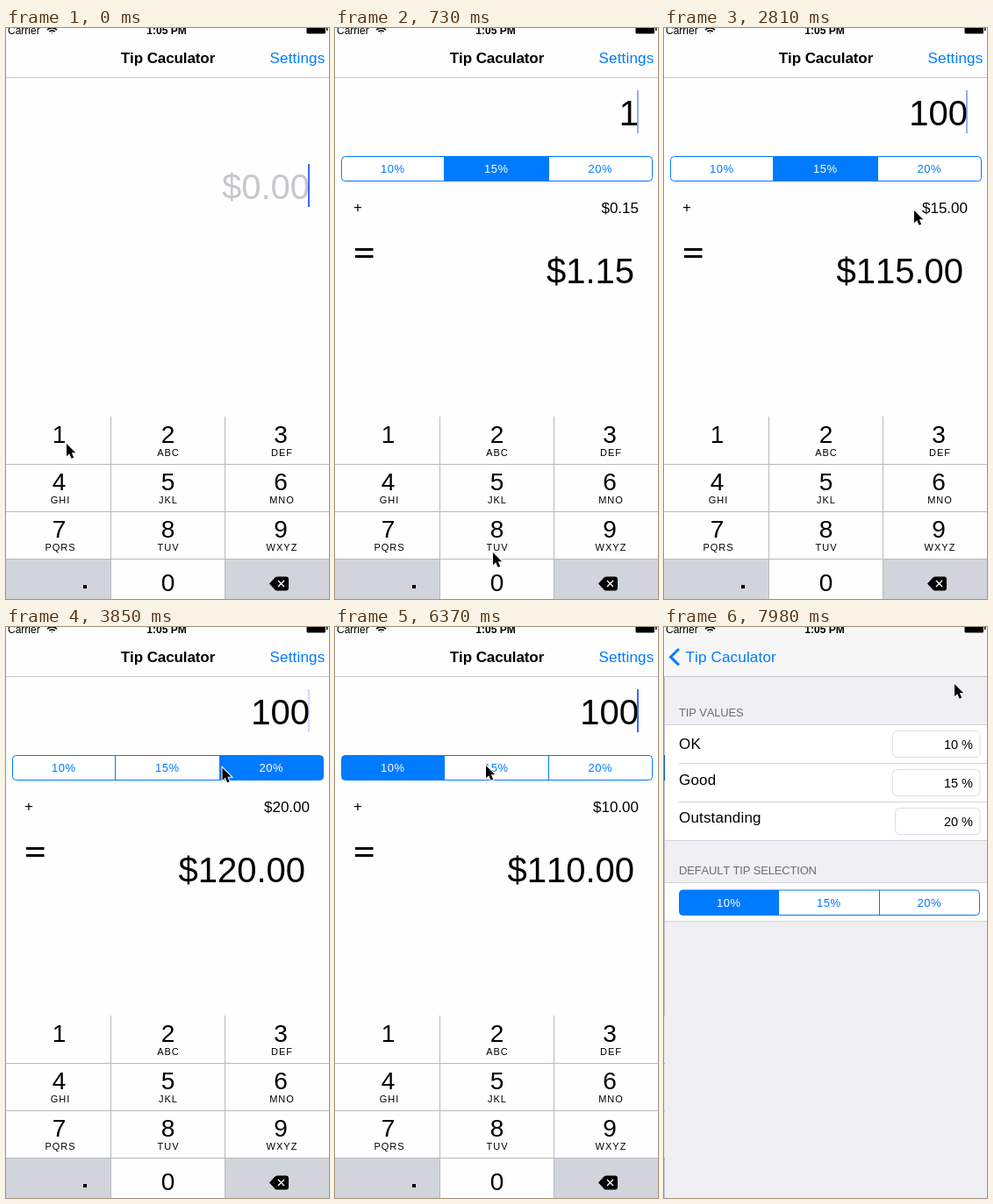
Recreate the animation shown at these times as an HTML page. Size 368 px wide and 651 px high, loop 8 s.

```html
<!DOCTYPE html>
<html lang="en">
<head>
<meta charset="utf-8">
<title>Tip calculator</title>
<style>
  html, body { margin: 0; width: 100%; height: 100%; overflow: hidden; background: #fefefe; }
  svg { display: block; width: 368px; height: 651px; }
  text { font-family: "Liberation Sans", Arial, sans-serif; font-size: 17px; font-kerning: none; white-space: pre; }
  .big { font-size: 40px; }
  .digit { font-size: 28px; }
  .letters { font-size: 11px; letter-spacing: 1px; }
  .seg { font-size: 13px; letter-spacing: .6px; }
  .head { font-size: 13px; letter-spacing: -.17px; fill: #6d6d72; }
  .field { font-size: 14.5px; }
  .status { font-size: 12px; }
  .bold { font-weight: bold; }
  .mid { text-anchor: middle; }
  .end { text-anchor: end; }
  .blue { fill: #007aff; }
  .wide { letter-spacing: .18px; }
</style>
</head>
<body>
<svg viewBox="0 0 368 651">
  <defs>
    <linearGradient id="shade">
      <stop offset="0" stop-color="#000" stop-opacity="0"/>
      <stop offset="1" stop-color="#000" stop-opacity=".2"/>
    </linearGradient>
  </defs>
  <rect width="368" height="651" fill="#fefefe"/>

  <g id="main">
    <g id="bill">
      <text id="amount" class="big end" x="346" y="110.5"></text>
      <rect id="caret" x="344" y="71" width="2" height="49" fill="#3f68ee"/>
    </g>
    <g id="results">
      <g id="tips"></g>
      <text x="21" y="209.5">+</text>
      <text id="tip" class="end" x="346" y="210.5"></text>
      <path d="M23 252.5h20.5M23 260.5h20.5" stroke="#000" stroke-width="3"/>
      <text id="total" class="big end" x="341" y="290.5"></text>
    </g>
    <g id="keys"></g>
  </g>
  <rect id="dim" width="368" height="651" opacity="0"/>

  <g id="page">
    <rect x="-9" y="57" width="9" height="386" fill="url(#shade)"/>
    <rect width="368" height="651" fill="#efeff4"/>
    <path d="M0 111.5H368V243.5H0zM0 291.5H368V335.5H0z" fill="#fff"/>
    <path d="M0 111.5H368M0 243.5H368M0 291.5H368M0 335.5H368M16 155.5H368M16 199.5H368" stroke="#d3d3d7"/>
    <text class="head" x="16" y="101.5">TIP VALUES</text>
    <text class="head" x="16" y="281.5">DEFAULT TIP SELECTION</text>
    <g id="rows"></g>
    <g id="defaults"></g>
  </g>

  <rect id="nav" width="368" height="56"/>
  <path d="M0 56.5H368" stroke="#c6c6c8"/>
  <text class="status" x="2" y="6.5">Carrier</text>
  <g fill="none" stroke="#000" stroke-width="1.6">
    <path d="M47 2.2Q52.5 -2.4 58 2.2M49.3 4.2Q52.5 1.6 55.7 4.2"/>
    <path d="M51.3 5.4h2.4l-1.2 1.2z" fill="#000" stroke="none"/>
  </g>
  <text class="status bold mid" x="183" y="6.5">1:05 PM</text>
  <path d="M342.5 0h21.5v5q0 1.5-1.5 1.5h-18.5q-1.5 0-1.5-1.5zM365 0h1.5v3h-1.5z"/>
  <text id="title" class="bold mid" y="40" x="184.5" letter-spacing="-.1">Tip Caculator</text>
  <text id="settings" class="blue wide" x="300.5" y="40">Settings</text>
  <text id="back" class="blue wide" x="24" y="40">Tip Caculator</text>
  <path id="chevron" d="M17 25L7.5 34.2L17 43.4" fill="none" stroke="#007aff" stroke-width="3"/>

  <path id="mouse" d="M0 0V14.2L3.2 11.2L5.6 16.8L8.2 15.7L5.8 10.2H10.2Z" stroke="#fff" stroke-width="2" paint-order="stroke"/>
</svg>
<script>
const $ = id => document.getElementById(id);
const BLUE = '#007aff', GREY = '#d1d5db';
const STEP = 147.8, LOOP = 8000;
const clamp = v => Math.min(1, Math.max(0, v));
const smooth = v => (v = clamp(v), v * v * (3 - 2 * v));
const put = (id, attrs) => { for (const a in attrs) $(id).setAttribute(a, attrs[a]); };
const move = (id, x, y = 0) => put(id, { transform: `translate(${x} ${y})` });
const text = (cls, x, y, s) => `<text class="${cls}" x="${x}" y="${y}">${s}</text>`;
const rates = [10, 15, 20];

// Segmented control between the given edges; returns a function that selects a segment
function segments(id, edges, y, h) {
  const [l, , , r] = edges;
  const clip = id + 'Clip';
  const cells = rates.map((_, i) =>
    `<rect class="cell" x="${edges[i]}" y="${y}" width="${edges[i + 1] - edges[i]}" height="${h}"/>`).join('');
  const labels = rates.map((n, i) =>
    text('seg mid', (edges[i] + edges[i + 1]) / 2 - .2, y + 18.5, n + '%')).join('');
  const box = `x="${l}" y="${y}" width="${r - l}" height="${h}" rx="4"`;
  $(id).innerHTML = `<clipPath id="${clip}"><rect ${box}/></clipPath>
    <g clip-path="url(#${clip})">${cells}</g>
    <g fill="none" stroke="${BLUE}"><rect ${box}/>
    <path d="M${edges[1]} ${y}v${h}M${edges[2]} ${y}v${h}"/></g>${labels}`;
  const fills = $(id).querySelectorAll('.cell'), names = $(id).querySelectorAll('text');
  return pick => rates.forEach((_, i) => {
    fills[i].setAttribute('fill', i === pick ? BLUE : '#fff');
    names[i].setAttribute('fill', i === pick ? '#fff' : BLUE);
  });
}

function buildKeys() {
  const letters = ' ABC DEF GHI JKL MNO PQRS TUV WXYZ'.split(' ');
  const cols = [60.5, 184.5, 313];
  let out = `<rect y="443" width="368" height="208" fill="#fefefe"/>
    <rect id="key1" y="443" width="119" height="54" fill="${GREY}"/>
    <rect id="key0" x="120" y="606" width="129" height="45" fill="${GREY}"/>
    <path d="M0 605.5H119V651H0zM250 605.5H368V651H250z" fill="${GREY}"/>
    <path d="M119.5 443V651M249.5 443V651M0 497.5H368M0 551.5H368M0 605.5H368" stroke="#b9babd"/>`;
  for (let i = 0; i < 9; i++) {
    const x = cols[i % 3], y = 473 + 54 * Math.floor(i / 3);
    out += text('digit mid', x, y, i + 1) + text('letters mid', x + (i % 3 === 1 ? .5 : 1.5), y + 15, letters[i]);
  }
  out += text('digit mid', 184.5, 642, 0) + `<rect x="88" y="635" width="4" height="4"/>
    <path d="M300 633.5L306 627Q307 625.5 309 625.5H319Q322 625.5 322 628.5V638.5Q322 641.5 319 641.5H309Q307 641.5 306 640z"/>
    <path d="M310 630l7 7m0-7l-7 7" stroke="#fff" stroke-width="1.4"/>`;
  $('keys').innerHTML = out;
}

function buildRows() {
  const rows = [['OK', 139, 259.5, 118.5, 30], ['Good', 180, 259.5, 162.5, 30], ['Outstanding', 223, 262.5, 206.5, 30]];
  $('rows').innerHTML = rows.map(([name, base, x, y, h], i) =>
    text('wide', 16, base, name) +
    `<rect x="${x}" y="${y}" width="${359 - x}" height="${h}" rx="5" fill="#fff" stroke="#dedee0"/>` +
    text('field end', 351, y + 20, rates[i] + ' %')).join('');
}

buildKeys();
buildRows();
const pickTip = segments('tips', [7.5, 124.5, 243.5, 361.5], 146.5, 28);
segments('defaults', [16.5, 129.5, 244.5, 358.5], 300, 28.5)(0);

// Pointer stops: step, x, y
const stops = [[0, 69, 474], [2, 69, 474], [3, 78, 486], [5, 180, 598], [7, 183, 631], [17, 183, 631],
  [19, 285, 208], [22, 306, 160], [24, 306, 160], [28, 187, 161], [30, 187, 161], [33, 74, 164],
  [36, 74, 164], [40, 172, 158], [45, 172, 158], [50, 336, 38], [52, 334, 40], [54, 331, 65]];

function pointer(k) {
  const i = Math.max(1, stops.findIndex(s => s[0] >= k));
  const [a, b] = [stops[i - 1], stops[i]];
  const p = smooth((k - a[0]) / (b[0] - a[0]));
  return [a[1] + (b[1] - a[1]) * p, a[2] + (b[2] - a[2]) * p];
}

// Last value whose step has been reached
const latest = (list, k) => list.filter(e => e[0] <= k).pop();
const typed = [[0, 0], [1, 1], [11, 10], [15, 100]];
const picks = [[0, 1], [23, 2], [29, 1], [35, 0]];

function caretAlpha(k, since) {
  const t = (k - since) * STEP, ph = t % 1000;
  if (k < 1) return 1;
  const rise = ph > 500 ? smooth((ph - 920) / 160) : t < 1000 ? 1 : smooth((ph + 80) / 160);
  return Math.max(rise, ph > 500 ? 1 - smooth((ph - 510) / 170) : 0);
}

function draw(k) {
  const [since, bill] = latest(typed, k), pick = latest(picks, k)[1];
  const tip = bill * rates[pick] / 100;
  const shown = smooth((k - 1) * STEP / 420);

  $('amount').textContent = bill ? bill : '$0.00';
  put('amount', { fill: bill ? '#000' : '#c7c7cd' });
  put('caret', { opacity: caretAlpha(k, since) });
  move('bill', 0, 84 * (1 - shown));
  put('results', { opacity: shown });
  $('tip').textContent = '$' + tip.toFixed(2);
  $('total').textContent = '$' + (bill + tip).toFixed(2);
  pickTip(pick);
  put('key1', { opacity: +(k === 1) });
  put('key0', { opacity: +(k === 15) });

  // Push to the settings page on a critically damped spring
  const w = Math.max(0, k * STEP - 7641) * .0232;
  const p = 1 - (1 + w) * Math.exp(-w), slide = Math.pow(p, 1.2);
  move('main', -110 * p);
  put('dim', { opacity: .1 * p });
  move('page', p ? Math.round(368 * (1 - p)) : 400);
  const tone = Math.round(254 - 7 * clamp(p * 4));
  put('nav', { fill: `rgb(${tone},${tone},${tone})` });
  move('title', -109 * slide);
  put('title', { opacity: clamp(1 - 1.6 * p) });
  move('back', 109 * (1 - slide));
  put('back', { opacity: slide });
  put('chevron', { opacity: p * p });
  put('settings', { opacity: (k >= 51 ? .2 : 1) * (1 - p) });
  move('mouse', ...pointer(k));
}

const start = performance.now();
function tick() {
  const t = (performance.now() - start) % LOOP;
  draw(Math.floor((t + 10) / STEP));
  requestAnimationFrame(tick);
}
tick();
</script>
</body>
</html>
```
